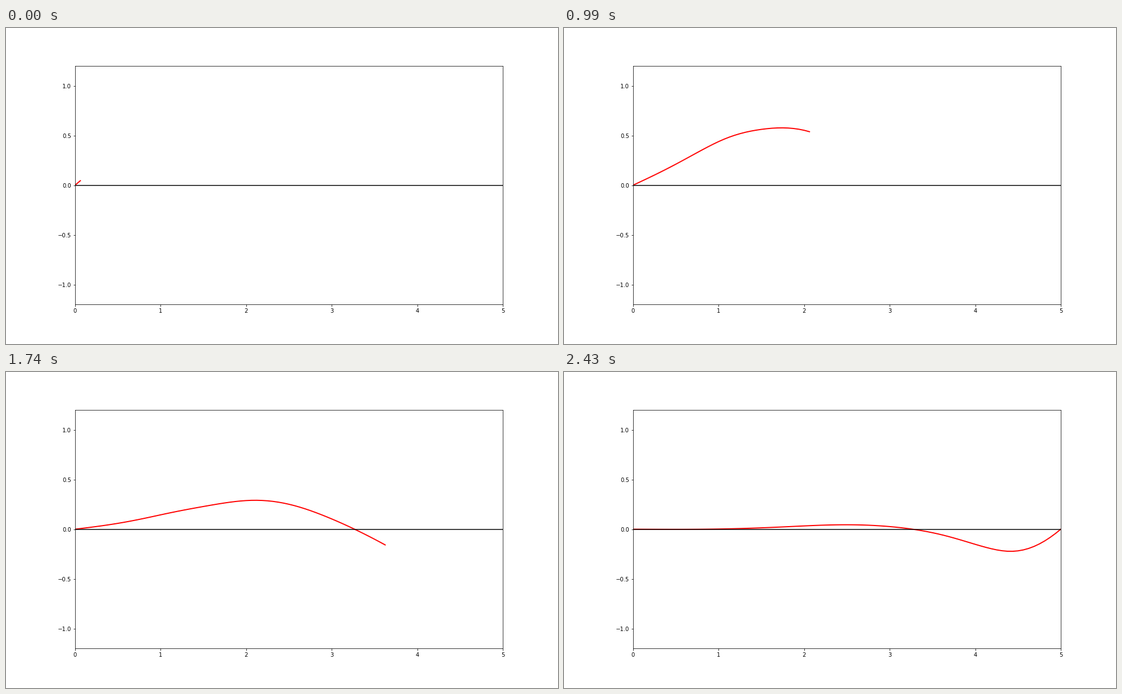
Animation of 990 by 566 pixels, one loop 2.46 s. Source, as a matplotlib script:

```python
import numpy as np
import matplotlib.pyplot as plt
from matplotlib.animation import FuncAnimation

W, H, DPI = 990, 566, 72
FRAMES, INTERVAL = 82, 30
LENGTH, CELLS = 5, 80

# Path followed by the tip of the wave.
TIP_X = np.array([0, .5, 1.06, 1.5, 2.06, 2.9, 3.6, 4.1, 4.4, 4.7, 5])
TIP_Y = np.array([0, .345, .594, .616, .539, .173, -.147, -.322, -.327, -.203, 0])


def spline(xk, yk, x):
    """Natural cubic spline through (xk, yk), evaluated at x."""
    n, h = len(xk), np.diff(xk)
    slope = np.diff(yk) / h
    a, b = np.eye(n), np.zeros(n)
    for j in range(1, n - 1):
        a[j, j - 1:j + 2] = h[j - 1], 2 * (h[j - 1] + h[j]), h[j]
        b[j] = 6 * (slope[j] - slope[j - 1])
    m = np.linalg.solve(a, b)
    k = np.clip(np.searchsorted(xk, x, side="right") - 1, 0, n - 2)
    d, e = x - xk[k], xk[k + 1] - x
    return ((m[k] * e**3 + m[k + 1] * d**3) / (6 * h[k])
            + (yk[k] / h[k] - m[k] * h[k] / 6) * e
            + (yk[k + 1] / h[k] - m[k + 1] * h[k] / 6) * d)


def wave(i):
    """The tip's path up to the front, flattened more the older it is."""
    progress = i / (FRAMES - 1)
    t = LENGTH * progress
    front = max(1, int(CELLS * progress + .75))
    x = np.arange(front + 1) * LENGTH / CELLS
    r = x / x[-1]
    floor = 1.04 * np.exp(-t**2 / 7.4) - .04
    late = progress**3.2
    rise = (1 - late) * np.sin(np.pi * r / 2)**2 + late * r**3
    return x, spline(TIP_X, TIP_Y, x) * (floor + (1 - floor) * rise)


plt.rcParams["font.family"] = "DejaVu Sans"
fig = plt.figure(figsize=(W / DPI, H / DPI), dpi=DPI, facecolor="white")
ax = fig.add_axes([.125, .125, .775, .755])
ax.set_xlim(0, LENGTH)
ax.set_ylim(-1.2, 1.2)
line, = ax.plot([], [], color="red", lw=2)
ax.plot([0, LENGTH], [0, 0], color="black", lw=1.5)


def update(i):
    line.set_data(*wave(i))
    return line,


anim = FuncAnimation(fig, update, frames=FRAMES, interval=INTERVAL,
                     repeat=True, repeat_delay=0, blit=False)
plt.show()
```
